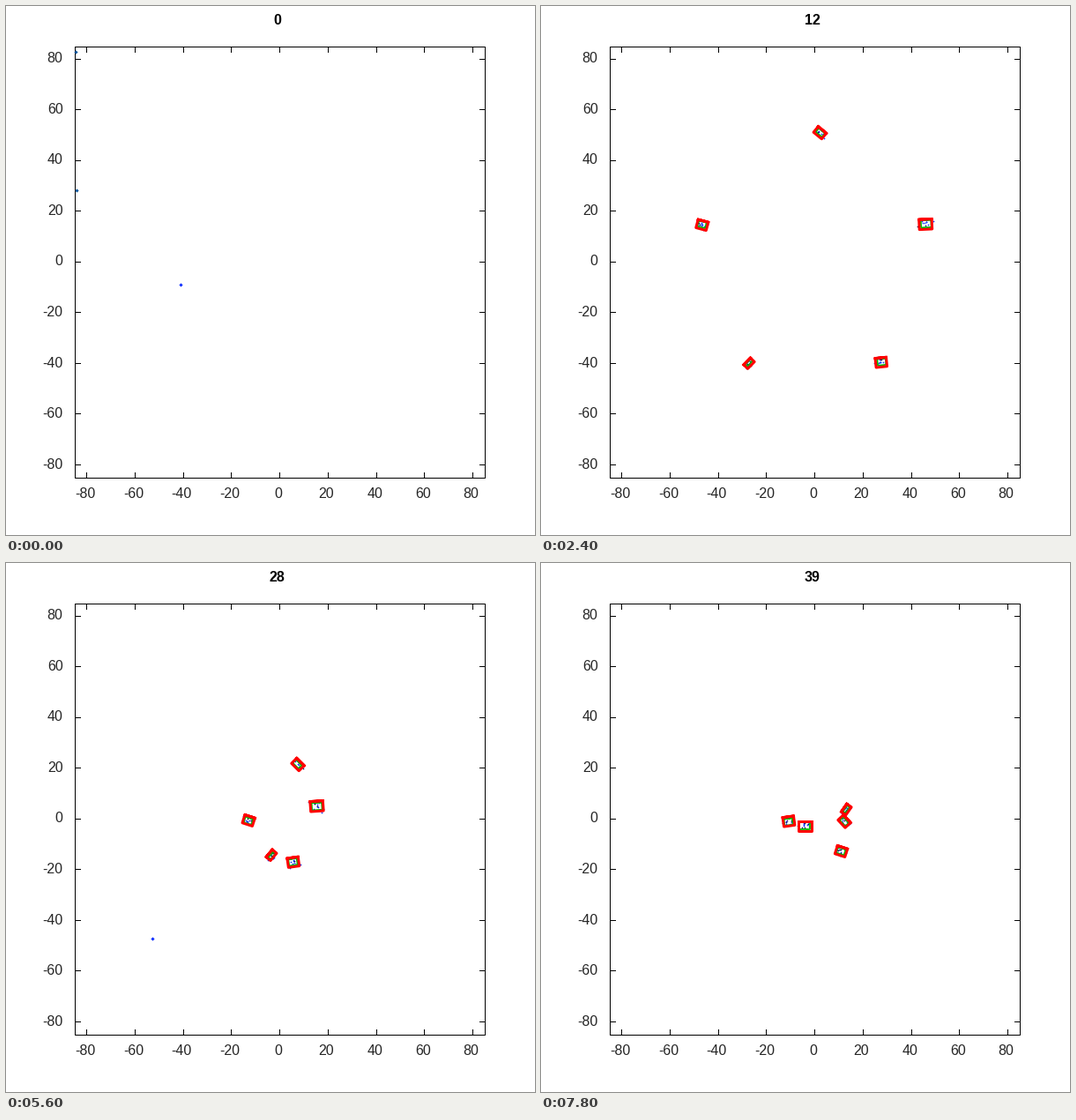
A matplotlib script for the animation above (8000 ms loop, 600 by 600 pixels).

```python
import numpy as np
import matplotlib.pyplot as plt
from matplotlib.animation import FuncAnimation

FRAMES, STEP_MS = 40, 200
PX = 0.72                      # points per pixel at 100 dpi
LEFT, RIGHT, TOP, BOTTOM = 77.5, 542.5, 45.5, 534.5
RED, GREEN, BLUE, TEAL = "#ff0000", "#00b800", "#1030ff", "#0a559c"

plt.rcParams["font.family"] = "Liberation Sans"
fig = plt.figure(figsize=(6, 6), dpi=100, facecolor="white")
ax = fig.add_axes([0, 0, 1, 1])
ax.set_xlim(0, 600)
ax.set_ylim(600, 0)
ax.axis("off")


def line(xs, ys, color="black", width=1, **kw):
    return ax.plot(xs, ys, color=color, lw=width * PX, **kw)[0]


def label(x, y, text, ha="center", color="#262626", **kw):
    return ax.text(x, y, text, ha=ha, va="baseline", color=color,
                   fontsize=16 * PX, **kw)


def draw_axes():
    line([LEFT, RIGHT, RIGHT, LEFT, LEFT], [TOP, TOP, BOTTOM, BOTTOM, TOP])
    for v in range(-80, 81, 20):
        x = 310.1 + v * (RIGHT - LEFT) / 170
        y = 289.9 - v * (BOTTOM - TOP) / 170
        for edge, inner in ((TOP, TOP + 6), (BOTTOM, BOTTOM - 6)):
            line([x, x], [edge, inner])
        for edge, inner in ((LEFT, LEFT + 6), (RIGHT, RIGHT - 6)):
            line([edge, inner], [y, y])
        label(x - 1.4, 558, str(v))
        label(64.5, y + 4.6, str(v), ha="right")


# Target paths: x, y and tilt in degrees at the key steps.
KEYS = [0, 8, 17, 22, 28, 32, 39]
TARGETS = [
    dict(birth=3, size=(12, 8.5), path=[
        (308, 84, 42), (313.5, 123.5, 42), (320, 169, 36), (324, 197, 45),
        (331, 228.5, 45), (336, 251.5, 39), (344, 293, 47)]),
    dict(birth=1, size=(14.5, 11.5), path=[
        (501, 225.5, -5), (457.5, 240, -5), (409.5, 257, 0), (383.5, 265, 3),
        (352.5, 275.8, -4), (332, 283.5, 0), (299.5, 298.3, 0)]),
    dict(birth=5, size=(12.5, 10.5), path=[
        (429, 459, -5), (400, 422.3, -5), (368, 381.5, -7), (350, 362, -8),
        (325.8, 339.3, -8), (309.5, 323, -8), (281, 293, -8)]),
    dict(birth=7, size=(11, 6.5), path=[
        (188, 462, -48), (220, 424, -48), (256, 381.7, -43), (276.3, 359.2, -53),
        (301, 331.3, -50), (318, 312, -54), (346.3, 279.5, -55)]),
    dict(birth=9, size=(12, 9.7), path=[
        (113, 215, 15), (160, 238, 15), (211.2, 261.3, 15), (240.7, 274.7, 14),
        (275.2, 292, 18), (298.7, 304.3, 18), (340.5, 327, 18)]),
]

# False detections by step
CLUTTER = {
    0: [(79.5, 52.5, TEAL), (80.5, 209.5, TEAL), (198.5, 316.5, BLUE)],
    4: [(521, 493, BLUE)],
    8: [(476.5, 444.5, BLUE)],
    10: [(508, 340, BLUE)],
    14: [(533, 531, BLUE)],
    17: [(465.5, 54.5, TEAL), (109.5, 317.5, BLUE)],
    20: [(537, 531, TEAL)],
    22: [(190.5, 110.5, BLUE)],
    28: [(165.5, 425.5, BLUE)],
    30: [(125, 428, BLUE)],
    33: [(537, 509, BLUE)],
    36: [(310, 437, BLUE)],
}

CORNERS = np.array([(-1, -1), (1, -1), (1, 1), (-1, 1)]) / 2

# Detections around each target and the offset of its true outline
np.random.seed(7)
SPREAD = np.random.normal(0, 0.3, (FRAMES, len(TARGETS), 14, 2)).clip(-0.62, 0.62)
SHIFT = np.random.uniform(-0.8, 0.8, (FRAMES, len(TARGETS), 2))


def place(points, x, y, tilt):
    a = np.radians(tilt)
    c, s = np.cos(a), np.sin(a)
    return points @ np.array([(c, s), (-s, c)]) + (x, y)


def closed(points):
    points = np.vstack([points, points[:2]])
    return points[:, 0], points[:, 1]


draw_axes()
title = label(307.5, 21, "0", color="black", weight="bold")
noise = ax.scatter([], [], s=(3 * PX) ** 2, marker="D", lw=0, zorder=3)
parts = []
for _ in TARGETS:
    hits = line([], [], BLUE, 0, marker="D", ms=1.5 * PX, mew=0, zorder=3)
    dark = line([], [], "#101060", 0, marker="D", ms=1.5 * PX, mew=0, zorder=3)
    truth = line([], [], GREEN, 1.8, zorder=4)
    box = line([], [], RED, 3, zorder=5)
    parts.append((hits, dark, truth, box))


def update(n):
    title.set_text(str(n))
    dots = CLUTTER.get(n, [])
    noise.set_offsets(np.array([d[:2] for d in dots]).reshape(-1, 2))
    noise.set_facecolors([d[2] for d in dots])

    for i, (target, group) in enumerate(zip(TARGETS, parts)):
        for part in group:
            part.set_data([], [])
        if n < target["birth"]:
            continue
        hits, dark, truth, box = group
        size = np.array(target["size"])
        x, y, tilt = (np.interp(n, KEYS, k) for k in zip(*target["path"]))
        box.set_data(*closed(place(CORNERS * size, x, y, tilt)))
        dx, dy = SHIFT[n, i]
        truth.set_data(*closed(place(CORNERS * (size - 3), x + dx, y + dy, tilt)))
        points = place(SPREAD[n, i] * size, x, y, tilt)
        hits.set_data(*points[:10].T)
        dark.set_data(*points[10:].T)
    return [title, noise] + [p for g in parts for p in g]


anim = FuncAnimation(fig, update, frames=FRAMES, interval=STEP_MS,
                     init_func=lambda: update(0), repeat=True, repeat_delay=0)
plt.show()
```
